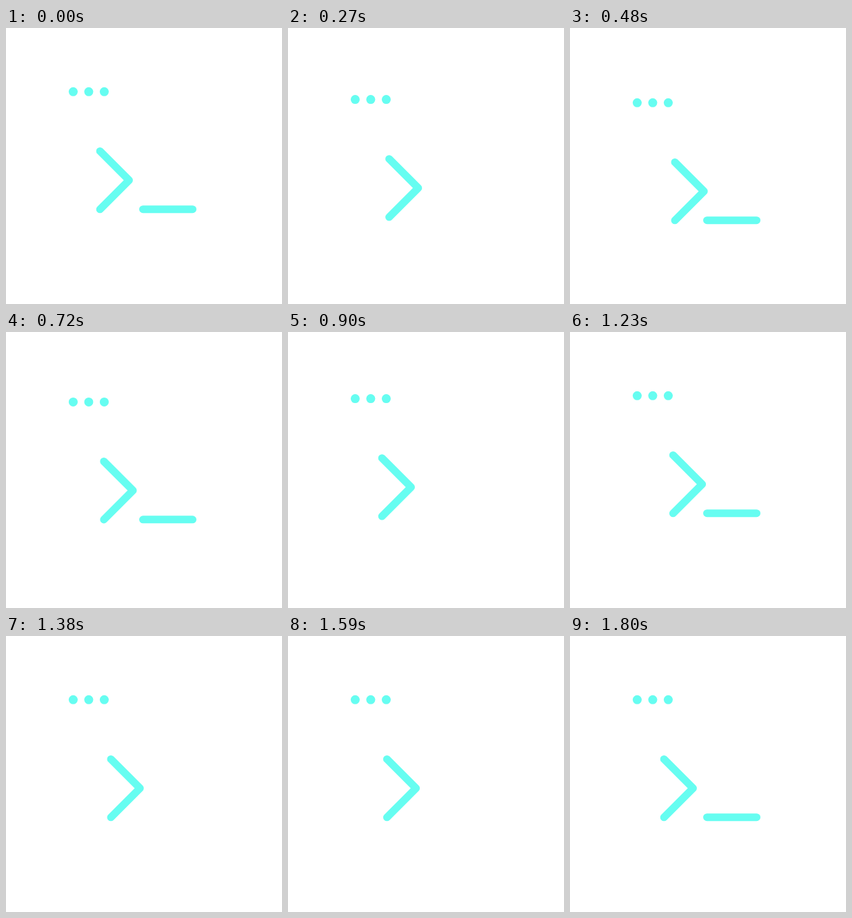
Recreate the animation shown at these times as an HTML page. Size 400x400 px, loop 1.83 s.

```html
<!DOCTYPE html>
<html lang="en">
<head>
<meta charset="utf-8">
<title>Terminal prompt</title>
<style>
  html, body { margin: 0; width: 100%; height: 100%; overflow: hidden; background: #fff; }
  svg { display: block; width: 100%; height: 100%; }
</style>
</head>
<body>
<svg viewBox="0 0 400 400">
  <g id="icon" fill="#66fdf1">
    <circle cx="97.4" cy="92.3" r="6.5"/>
    <circle cx="119.9" cy="92.3" r="6.5"/>
    <circle cx="142.4" cy="92.3" r="6.5"/>
    <g fill="none" stroke="#66fdf1" stroke-width="11" stroke-linecap="round" stroke-linejoin="round">
      <path id="chevron" d="M136.2 178.4 L178.4 220.6 L136.2 262.8"/>
      <path id="cursor" d="M198.5 262.7 H270.5"/>
    </g>
  </g>
</svg>
<script>
const LOOP = 1830, STEP = 30, SHIFT = 16;
const icon = document.getElementById('icon');
const chevron = document.getElementById('chevron');
const cursor = document.getElementById('cursor');

const bezier = (a, b, s) => 3 * a * s * (1 - s) ** 2 + 3 * b * s * s * (1 - s) + s ** 3;

// Straight start, soft landing: cubic-bezier(1/6, 1/6, 2/3, 1).
function settle(p) {
  let lo = 0, hi = 1;
  for (let i = 0; i < 24; i++) {
    const mid = (lo + hi) / 2;
    if (bezier(1 / 6, 2 / 3, mid) < p) lo = mid; else hi = mid;
  }
  return bezier(1 / 6, 1, lo);
}

function drop(t) {
  if (t < 480) return SHIFT * settle(t / 480);
  if (t < 1200) return SHIFT * (1 - settle((t - 480) / 720));
  return 0;
}

// Eased out and back every 900 ms.
function nudge(t) {
  const p = 1 - Math.abs(t % 900 - 450) / 450;
  return SHIFT * p * p * (3 - 2 * p);
}

function cursorOn(t) {
  const phase = t % 600;
  return phase < 150 || phase >= 450;
}

function draw(now) {
  const t = Math.floor((now % LOOP) / STEP) * STEP;
  icon.setAttribute('transform', `translate(0 ${drop(t).toFixed(2)})`);
  chevron.setAttribute('transform', `translate(${nudge(t).toFixed(2)} 0)`);
  cursor.setAttribute('visibility', cursorOn(t) ? 'visible' : 'hidden');
}

const start = performance.now();
function tick() {
  draw(performance.now() - start);
  requestAnimationFrame(tick);
}
tick();
</script>
</body>
</html>
```
